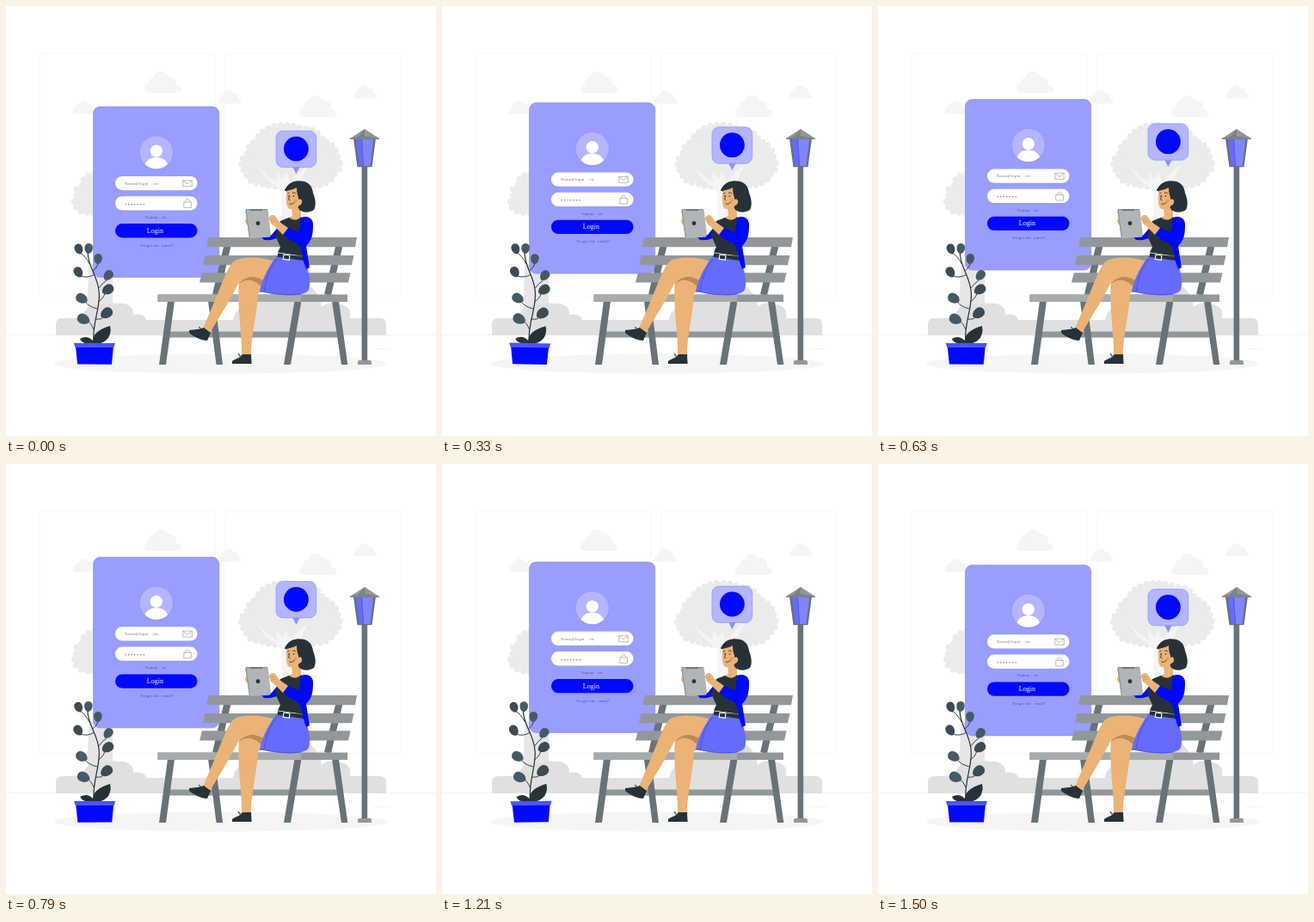
An HTML page that plays this animation: 500 px wide and 500 px high, repeating every 1.54 s.

```html
<!DOCTYPE html>
<html lang="en">
<head>
<meta charset="utf-8">
<style>
html, body { margin: 0; width: 100%; height: 100%; overflow: hidden; background: #fff }
svg { display: block; width: 100vw; height: 100vh }
text { font-family: "Liberation Serif", "Times New Roman", serif }
.small { font-size: 4.6px; letter-spacing: .3px; fill: #263238; opacity: .65; white-space: pre }
.light { fill: #92979a }
.dark { fill: #687277 }
.skin { fill: #ebb376 }
.ink { fill: #263238 }
.blue { fill: #0009ff }
.fluffy { stroke-width: 7; stroke-linecap: round; stroke-dasharray: 0 7.5 }
</style>
</head>
<body>
<svg viewBox="0 0 500 500">
<defs>
  <path id="cloud" fill="#f5f5f5" d="M4 25C-2 25-1 15 5 14C5 9 8 7 11 7C13-2 24-2 28 6C34 5 38 10 37 16C44 16 45 25 40 25Z"/>
  <path id="leaf" d="M0 7.500C-5 6-6.500 0-5-4C-3-8 3-8 5-4C6.500 0 5 6 0 7.500Z"/>
</defs>

<g id="background">
  <g fill="none" stroke="#f5f5f5" stroke-width=".8">
    <rect x="39" y="55.3" width="204" height="282" rx="2"/>
    <rect x="255" y="55.3" width="204" height="282" rx="2"/>
    <path d="M0 382.5H500M427 398.5H448" stroke="#efefef"/>
  </g>
  <use href="#cloud" x="161" y="76"/>
  <use href="#cloud" x="341" y="104"/>
  <use href="#cloud" transform="translate(78 110) scale(.62)"/>
  <use href="#cloud" transform="translate(247 98) scale(.62)"/>
  <use href="#cloud" transform="translate(404 92) scale(.62)"/>
  <ellipse cx="250" cy="416" rx="194" ry="11.5" fill="#f5f5f5"/>
  <g fill="#ebebeb" stroke="#ebebeb">
    <path class="fluffy" d="M290 158C292 149 300 145 304 143C314 136 333 137 345 143C359 142 366 149 369 157C379 160 385 167 385 174C391 183 388 191 383 195C379 207 361 211 350 208L325 212C314 209 304 211 296 206C284 206 279 200 279 194C271 188 272 177 280 172C281 163 285 160 290 158Z"/>
    <path class="fluffy" d="M110 192L98 196Q88 199 88 209Q79 212 82 221Q76 230 83 236Q88 242 110 241Z"/>
  </g>
  <g fill="#e0e0e0">
    <path fill="#e6e6e6" d="M96 300H124V383H94Z"/>
    <path d="M58 383V369Q59 363 65 363H88C92 347 108 344 117 348Q122 344 130 346C142 344 149 351 148 359C157 357 163 361 163 365H270V383Z"/>
    <path d="M442 383V369Q441 363 435 363H400C402 354 397 347 388 347C380 344 372 345 367 350C366 333 352 322 340 323C324 318 306 328 302 342C288 340 272 348 266 358L258 383Z"/>
  </g>
  <path fill="#f5f5f5" d="M291 183Q301 198 315 204L314 193L322 201L326 193L330 204L352 184Q344 202 337 212L336 270H321L320 213Q302 205 291 183Z"/>
</g>

<g class="float">
  <rect x="101.5" y="117.4" width="146.3" height="198.5" rx="8" fill="#999dff" stroke="#8589fa" stroke-width=".6"/>
  <circle cx="174.8" cy="170.8" r="19.5" fill="#b3b5ff" stroke="#8084ff" stroke-width=".4"/>
  <g fill="#fff">
    <circle cx="174.8" cy="169" r="7.1"/>
    <path d="M161.500 184.500C164 178.500 169 176.300 174.800 176.300S185.600 178.500 188.100 184.500A19.500 19.500 0 0 1 161.500 184.500Z"/>
    <rect x="127" y="198.3" width="95.5" height="16.3" rx="8.1"/>
    <rect x="127" y="221.6" width="95.5" height="16.3" rx="8.1"/>
  </g>
  <rect class="blue" x="127" y="253.5" width="95.5" height="16.3" rx="8.1"/>
  <g fill="none" stroke="#a6a6a6" stroke-width=".75">
    <path d="M205.8 203.2H216.2V210.2H205.8ZL211 207.3L216.2 203.2"/>
    <path d="M206.8 228.4H215.4V234.8H206.8ZM208.6 228.4C208.5 224 213.6 224 213.6 228.4"/>
  </g>
  <text class="small" x="138" y="208">Name@login   .etc</text>
  <text x="138" y="233" font-size="6.5" letter-spacing="1.25" fill="#777">•••••••</text>
  <text class="small" x="162" y="247.3">Signup   on</text>
  <text x="163.8" y="264.1" font-size="8" fill="#fff">Login</text>
  <text class="small" x="156.5" y="280.2">Forgot the  email?</text>
</g>

<g id="plant">
  <g fill="none" stroke="#263238" stroke-width="1.2">
    <path d="M102 391C100 367 111 349 108 331C106 313 96 305 95 287"/>
    <path d="M97 300Q92 290 86 287M103 312Q95 317 87 314M108 328Q112 322 117 319M107 344Q113 341 115 334M106 352Q97 350 92 344M104 364Q112 365 114 361M102 376Q99 368 94 366M101 308Q106 304 107 300" stroke-width=".9"/>
  </g>
  <g id="leaves"></g>
  <path class="ink" d="M86 387Q94 382 101 389Q101 378 121 372Q123 379 119 386Q114 392 106 393H96Q88 392 86 387Z"/>
  <path class="blue" d="M81 396H125L123 416.6H83.2Z"/>
  <path fill="#4d53ff" d="M79 392H127L125.6 397H80.4Z"/>
</g>

<g id="bench">
  <path class="light" d="M189 378.5H388V385.5H189Z"/>
  <path class="dark" d="M188 343H196L186 417H178ZM235 343H243L252 417H244.5ZM335.500 343H343.500L331 417H323ZM379 343H387L397.300 417H390Z"/>
  <path d="M259 272L244 336M389 272L374 336" stroke="#687277" stroke-width="8"/>
  <path class="light" d="M235.500 269H408L406 280.300H233ZM231.500 290H404.500L402 301.300H229ZM228 310.300H400.500L398 321.500H225ZM176.500 335.500H397V344H176.500Z"/>
  <path fill="#a6abad" d="M176.500 335.500H343V344H176.500Z"/>
</g>

<g id="lamp">
  <path class="dark" d="M413.600 185H420.200V414H413.600Z"/>
  <path class="light" d="M409 417V414Q409 412 411 412H423Q425 412 425 414V417Z"/>
  <path class="dark" d="M404 154H430L425.500 187.300H408.500Z"/>
  <path fill="#666bff" d="M406.800 155H427.200L423.300 186H410.700Z"/>
  <path fill="#8084ff" d="M414 155H427.200L423.300 186H416Z"/>
  <path d="M413.500 155L415.500 186" stroke="#5055c8" stroke-width=".8"/>
  <path class="light" d="M417 143L434 154V155H400V154Z"/>
  <path class="dark" d="M417 143L409 152L400 154V155H434V154L417 151Z" opacity=".55"/>
</g>

<g class="float">
  <path fill="#8c90ff" d="M333 187H342L337.400 196Z"/>
  <rect x="314" y="145.600" width="46.800" height="42.400" rx="8" fill="#b3b5ff" stroke="#8589f5" stroke-width=".6"/>
  <circle class="blue" cx="337.400" cy="166.500" r="14.400"/>
</g>

<g id="woman">
  <path class="skin" d="M271 318L294 314L308 330L293 334C293 350 286 378 284.500 407H274C275 382 268 350 271 318Z"/>
  <path fill="#bd8a56" d="M271 323C279 311 291 312 302 322L300 330C293 321 282 314 271 323Z"/>
  <path class="skin" d="M315 298C298 291 276 291 266 296C257 302 250 328 229 375L237 380C249 361 262 339 270 323C280 312 294 313 303 322Z"/>
  <path class="ink" d="M213 377C219 376 225 376 230 374L238 380L234 389C227 389 217 384 213 380ZM263 416V413C266 410 272 410 275 405H285L285.600 416Z"/>
  <path d="M227 376Q223 371 225 374T230 377M273 409Q268 402 271 405T276 409" fill="none" stroke="#263238" stroke-width=".8"/>
  <path fill="#666bff" d="M317 288L346 293C352 306 355 321 352 330C347 338 326 338 295 332C298 316 307 300 317 288Z"/>
  <path d="M315 294Q304 306 300 332M295 331Q320 338 343 335" fill="none" stroke="#454bd8" stroke-width=".8"/>

  <path class="blue" d="M318 255L309 266Q302 269 296 268L300 272Q312 273 318 268Z"/>
  <path class="skin" d="M332 231L343 233V246C340 253 333 254 327 247L333 244Z"/>
  <path class="ink" d="M319 250L329 246Q337 252 343 245L350 260L347 291L316 286.500L319 280L313 267Z"/>
  <path d="M316 289.500L347 294" stroke="#263238" stroke-width="4.500"/>
  <path d="M323 289L330 290L329.300 295.300L322.300 294.300Z" fill="#263238" stroke="#fff" stroke-width="1.100"/>
  <path class="blue" d="M343 246C351 243 358 247 357 256C357 267 355 273 349 279L353 304L349 306L345 294C345 284 342 281 339 276Q330 274 322 265L327 257Q334 261 341 263Z"/>
  <path d="M341 263Q345 259 345 254M339 276Q343 277 347 275" fill="none" stroke="#0000b8" stroke-width=".7"/>

  <path class="skin" d="M285 246Q278 246 278 250Q279 256 286 256Z"/>
  <path d="M279.500 236H302.500Q304.500 236 304.800 238L308 266.500Q308 268.500 306 268.700L285 270Q283 270 282.700 268L278.300 238Q278 236 279.500 236Z" fill="#b1b5b7"/>
  <path d="M279 236.600H304M279 238L283.500 269.500" fill="none" stroke="#8b9194" stroke-width="1.100"/>
  <path d="M284 237.300H298" stroke="#687277" stroke-width="1.600"/>
  <circle class="ink" cx="293" cy="252.700" r="2.400"/>
  <path class="skin" d="M305 247Q309 241 313 244L318 251L328 258L322 266Q316 260 312 256Q307 253 307 249Z"/>
  <path d="M307 249L312 247M308 252L313 250" stroke="#bd8a56" stroke-width=".6"/>

  <path class="ink" d="M324 214C328 207 335 203 341 203.500C351 203 356 209 357 217C360 225 361 232 358 237C352 241 345 240 341 237L333 220Z"/>
  <path class="skin" d="M328 211C325 220 325 230 328 235C332 238 338 236 341 232Q345 230 344 226Q342 223 340 225L341 211Z"/>
  <path class="ink" d="M324 215C327 206 334 203 341 203.500L347 212L341 225Q338 219 338 211Q333 214 324 215Z"/>
  <g fill="none" stroke="#263238" stroke-width=".8">
    <path d="M327 218L329.500 217.500M333 217.500Q335 216 337 218M330 220L328.500 225L330.500 226M329.500 230Q333 231.500 336 228"/>
    <circle cx="334.500" cy="221" r=".5"/>
    <circle cx="328.600" cy="221" r=".3"/>
  </g>
  <circle cx="337" cy="226" r="1.600" fill="#df955f"/>
</g>
</svg>
<script>
const LOOP = 1540, CYCLE = 1500, LEAD = 28;
const floating = document.querySelectorAll('.float');
const plant = document.getElementById('plant');

// x, y of the leaf centre, rotation, scale
const leaves = [
  [96, 282, 5, .85], [84.5, 282.5, -20, .85], [107, 294, 5, .85], [84, 309.5, -30, .9],
  [119, 313, 40, .9], [118.5, 329.5, 58, 1], [88, 340, -60, 1], [117, 357, 55, 1.05], [90, 364, -65, 1.05]
];
document.getElementById('leaves').innerHTML = leaves.map(([x, y, turn, size], i) =>
  `<use href="#leaf" fill="${i % 2 ? '#3d4b54' : '#455a64'}" transform="translate(${x} ${y}) rotate(${turn}) scale(${size})"/>`
).join('');

// Sways 0, 1, -1, 0 degrees at 0, 25, 75 and 100 %.
const sway = p => p < .25 ? p * 4 : p < .75 ? 2 - p * 4 : p * 4 - 4;

function draw(now) {
  const p = Math.min(1, (now % LOOP + LEAD) / CYCLE);
  const lift = 10 * (1 - Math.abs(1 - 2 * p));
  floating.forEach(g => g.setAttribute('transform', `translate(0 ${-lift})`));
  plant.setAttribute('transform', `rotate(${sway(p)} 102 346)`);
  requestAnimationFrame(draw);
}
draw(performance.now());
</script>
</body>
</html>
```
